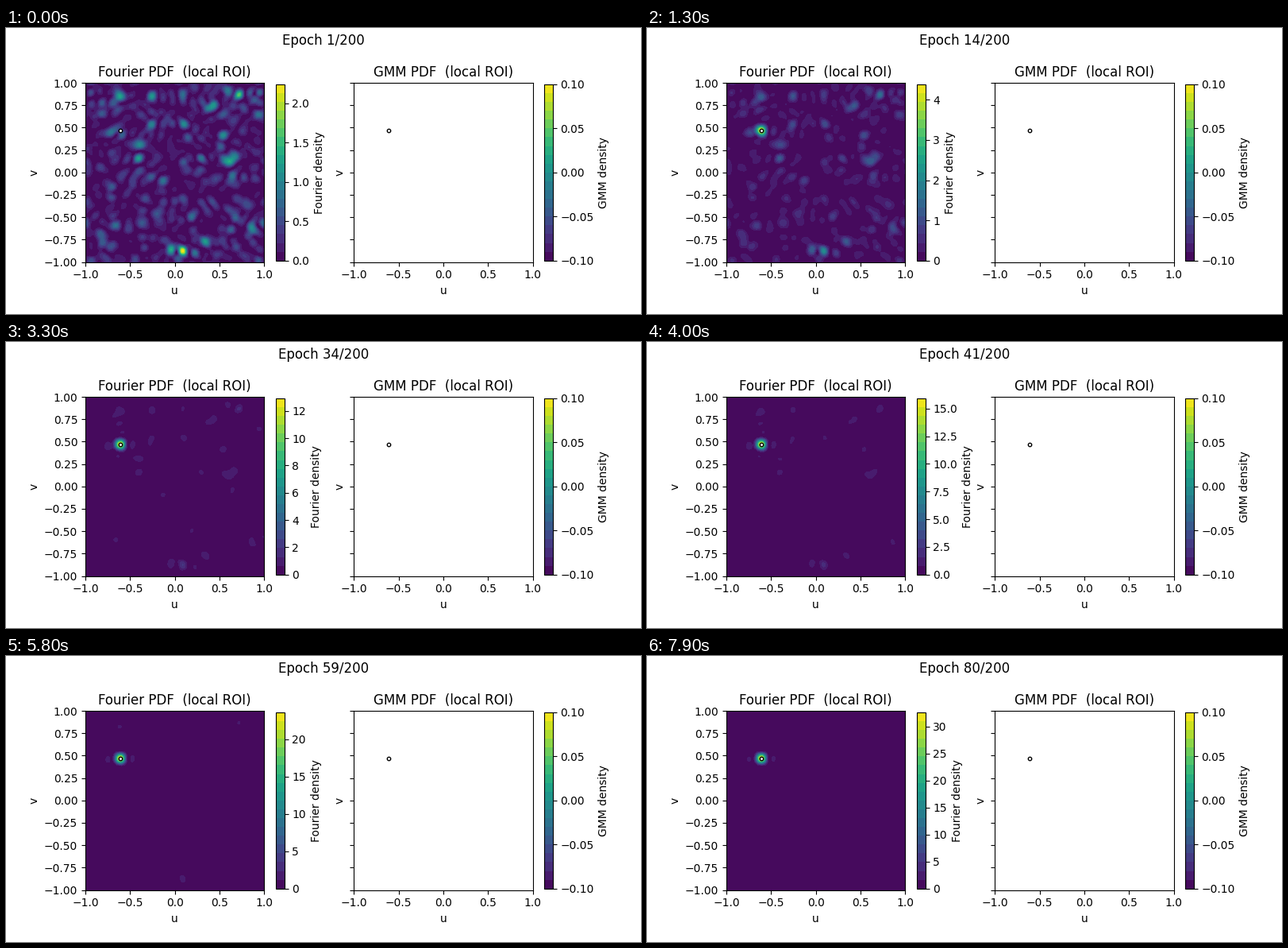
Write a matplotlib script that moves like this. It is 800 by 360 pixels and loops after 8 s.

```python
import numpy as np
import matplotlib.pyplot as plt
from matplotlib.animation import FuncAnimation
from matplotlib.cm import ScalarMappable
from matplotlib.colors import ListedColormap, Normalize

EPOCHS, BANDS, ORDER = 80, 20, 10
SPOT = (-0.61, 0.47)
MEAN, NOISE_MAX = 0.25, 2.25

plt.rcParams["font.family"] = "DejaVu Sans"
fig, (left, right) = plt.subplots(1, 2, figsize=(8, 3.6), dpi=100, sharey=True)
cmap = ListedColormap(plt.get_cmap("viridis")((np.arange(BANDS) + 0.5) / BANDS))

axis = np.linspace(-1, 1, 181)
modes = np.arange(-ORDER, ORDER + 1)


def basis(t):
    return np.exp(1j * np.pi * np.outer(t, modes))


def kernel(u, v):
    """Band-limited unit peak at (u, v)."""
    col, row = (basis(axis - c).real.mean(axis=1) for c in (v, u))
    return np.outer(col, row)


def at(field, u, v):
    return field[np.abs(axis - v).argmin(), np.abs(axis - u).argmin()]


# Random Fourier series, with its brightest spots pinned
rng = np.random.default_rng(11)
coef = rng.normal(size=(2, modes.size, modes.size))
noise = basis(axis) @ (coef[0] + 1j * coef[1]) @ basis(axis).T
noise *= np.sqrt(0.85 * MEAN / np.mean(np.abs(noise) ** 2))

BRIGHT = [
    (0.10, -0.87, 2.25), (-0.05, -0.86, 1.8), (0.35, -0.77, 1.7),
    (0.40, 0.72, 1.6), (-0.27, 0.84, 1.8), (-0.60, 0.84, 1.7),
    (-0.40, 0.14, 1.6), (0.67, 0.19, 1.4), (0.11, 0.52, 1.3),
    (-0.24, 0.53, 1.3), (0.87, -0.64, 1.4), (-0.73, 0.43, 1.2),
]
for u, v, height in BRIGHT:
    here = at(noise, u, v)
    noise += (np.sqrt(height) * here / abs(here) - here) * kernel(u, v)
noise -= at(noise, *SPOT) * kernel(*SPOT)
noise *= np.sqrt(NOISE_MAX) / np.abs(noise).max()
peak = kernel(*SPOT)


def density(epoch):
    top = 0.43 * 2.5 * np.log1p(np.exp((epoch - 3.8) / 2.5))
    rest = 1 - top * 4 / modes.size ** 2  # total mass stays one
    return np.abs(np.sqrt(rest) * noise + np.sqrt(top) * peak) ** 2


def make_panel(ax, name, low, high):
    ax.set(xlim=(-1, 1), ylim=(-1, 1), aspect="equal", xlabel="u", ylabel="v",
           title=f"{name} PDF  (local ROI)")
    ax.scatter(*SPOT, s=10, c="white", edgecolors="black", linewidths=1, zorder=5)
    scale = ScalarMappable(Normalize(low, high), cmap)
    fig.colorbar(scale, ax=ax, shrink=0.8, label=f"{name} density")
    return scale


scale = make_panel(left, "Fourier", 0, NOISE_MAX)
make_panel(right, "GMM", -0.1, 0.1)
heading = fig.suptitle("")
fills = []


def update(i):
    z = density(i + 1)
    high = z.max()
    while fills:
        fills.pop().remove()
    fills.append(left.contourf(axis, axis, z, cmap="viridis",
                               levels=np.linspace(0, high, BANDS + 1)))
    scale.set_clim(0, high)
    heading.set_text(f"Epoch {i + 1}/200")
    return []


anim = FuncAnimation(fig, update, frames=EPOCHS, interval=100, repeat=True, repeat_delay=0)
plt.show()
```
